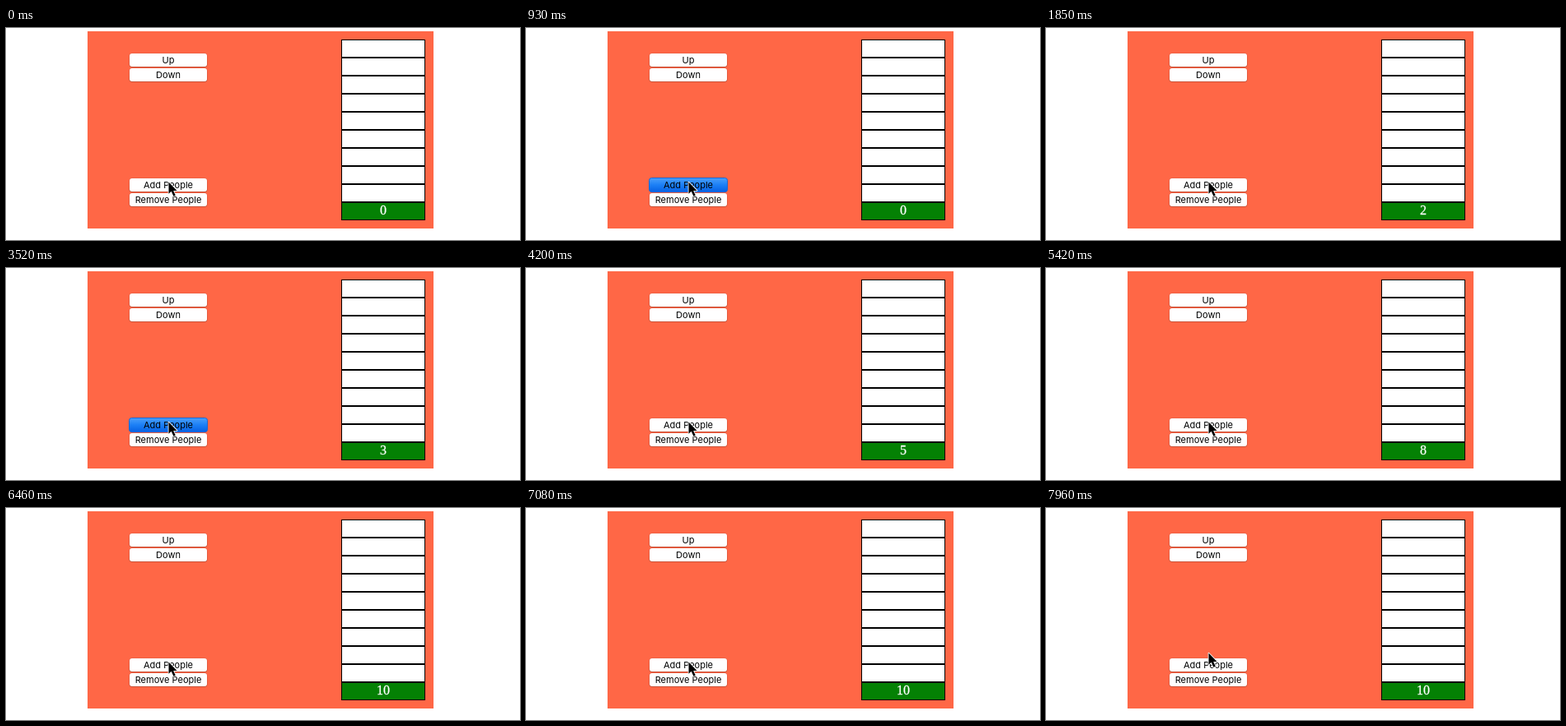
These frames come from a looping animation (624 px wide and 258 px high, 7.99 s). An HTML page:

```html
<!DOCTYPE html>
<html lang="en">
<head>
<meta charset="utf-8">
<title>Elevator</title>
<style>
html, body { margin: 0; width: 100%; height: 100%; overflow: hidden; background: #fff; }
svg { display: block; width: 624px; height: 258px; }
.label { font: 11px Inter, sans-serif; text-anchor: middle; }
.count { font: 16px "Liberation Serif", serif; text-anchor: middle; fill: #fff; stroke: #fff; stroke-width: .3px; }
</style>
</head>
<body>
<svg id="stage" viewBox="0 0 624 258">
  <defs>
    <linearGradient id="blue" x2="0" y2="1">
      <stop offset="0" stop-color="#4a9ffb"/>
      <stop offset=".5" stop-color="#1c80f6"/>
      <stop offset="1" stop-color="#0661e4"/>
    </linearGradient>
    <linearGradient id="rim" x2="0" y2="1">
      <stop offset="0" stop-color="#e25a42"/>
      <stop offset="1" stop-color="#b9482f"/>
    </linearGradient>
  </defs>
  <rect x="99" y="4" width="420" height="240" fill="#ff6746"/>
  <g id="floors"></g>
  <g id="buttons"></g>
  <text id="count" class="count" x="458" y="227">0</text>
  <path id="cursor" d="M197.5 187.5v14.2l3.2-2.9 2.7 6 2.4-1-2.6-5.9h4.4z"
        stroke="#fff" stroke-width="1.6" paint-order="stroke" stroke-linejoin="round"/>
</svg>
<script>
const LOOP = 7990, CAPACITY = 10;
// Press and release times of each click on "Add People"
const clicks = [
  [930, 1200], [1580, 1850], [2960, 3130], [3520, 3790], [4090, 4200],
  [4560, 4740], [4920, 5100], [5280, 5420], [5720, 5840], [6160, 6460],
  [6700, 6850], [6930, 7080], [7170, 7310], [7430, 7550], [7690, 7780]
];
const cursorSteps = [[0, 0], [7930, -5], [7960, -11]];

const byId = id => document.getElementById(id);

function add(parent, tag, attrs, text = '') {
  const el = document.createElementNS('http://www.w3.org/2000/svg', tag);
  for (const key in attrs) el.setAttribute(key, attrs[key]);
  el.textContent = text;
  return parent.appendChild(el);
}

for (let i = 0; i < 10; i++) {
  add(byId('floors'), 'rect', {
    x: 407.5, y: 14.5 + i * 22, width: 101, height: 21,
    fill: i === 9 ? '#048104' : '#fff', stroke: '#000'
  });
}

function addButton(label, y) {
  const g = add(byId('buttons'), 'g', {});
  add(g, 'rect', { x: 149.5, y: y + .5, width: 95, height: 17.2, rx: 3.5, fill: 'url(#rim)' });
  add(g, 'rect', { x: 150, y: y + 1, width: 94, height: 16, rx: 3, fill: '#fff' });
  const pressed = add(g, 'rect', {
    x: 149.5, y: y + .5, width: 95, height: 17, rx: 3,
    fill: 'url(#blue)', stroke: '#1767d6', visibility: 'hidden'
  });
  add(g, 'text', { x: 197, y: y + 13, class: 'label' }, label);
  return pressed;
}

addButton('Up', 30);
addButton('Down', 48);
const addPressed = addButton('Add People', 182);
addButton('Remove People', 200);

function draw(now) {
  const t = now % LOOP;
  const isDown = clicks.some(([down, up]) => t >= down && t < up);
  const people = clicks.filter(([, up]) => t >= up).length;
  const [, dy] = cursorSteps.filter(([at]) => t >= at).pop();
  addPressed.setAttribute('visibility', isDown ? 'visible' : 'hidden');
  byId('count').textContent = Math.min(people, CAPACITY);
  byId('cursor').setAttribute('transform', `translate(0 ${dy})`);
}

const start = performance.now();
function tick() {
  draw(performance.now() - start);
  requestAnimationFrame(tick);
}
tick();
</script>
</body>
</html>
```
